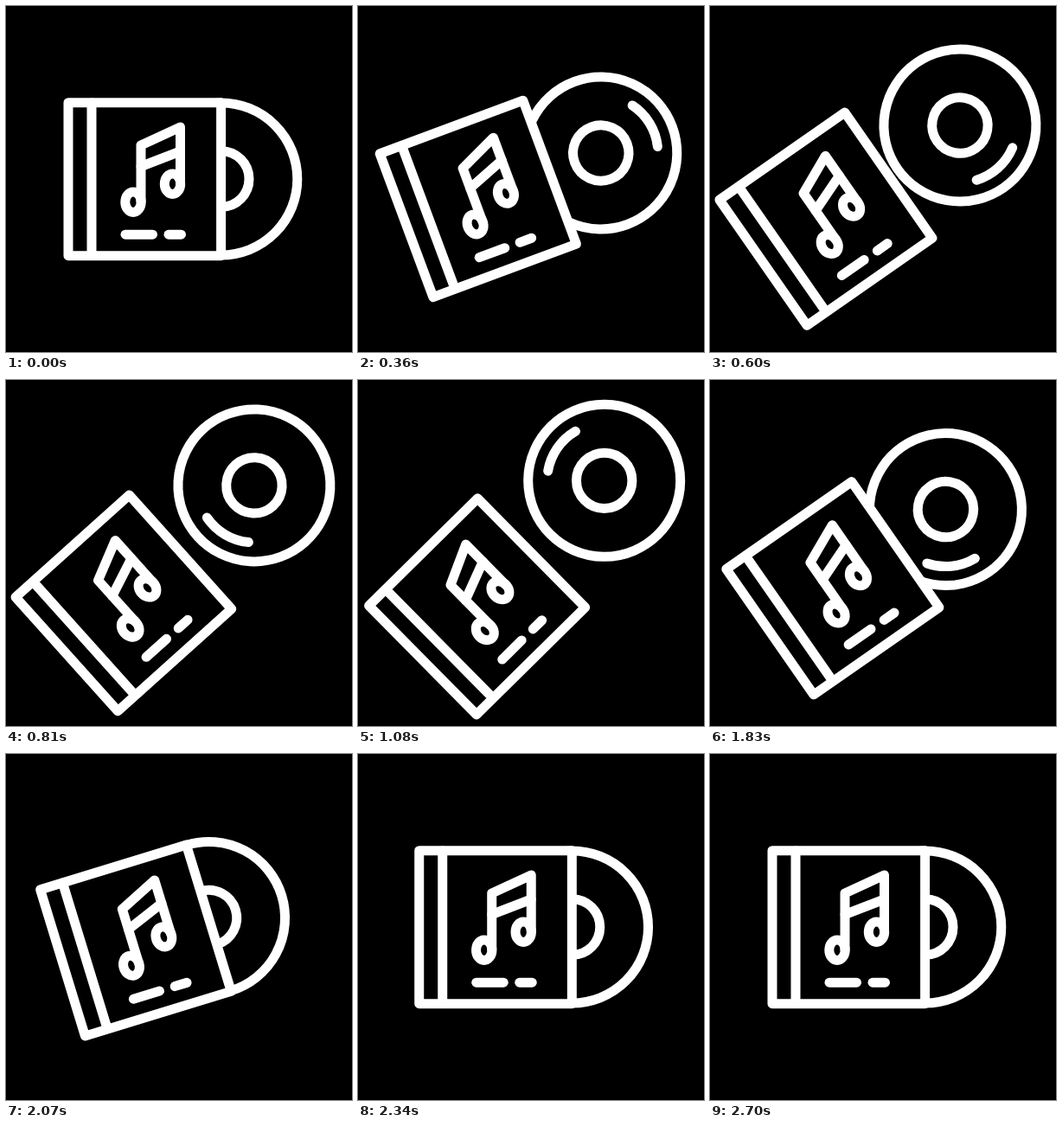
These frames come from a looping animation (400 by 400 pixels, 2730 ms). An HTML page with a canvas:

```html
<!DOCTYPE html>
<html lang="en">
<head>
<meta charset="utf-8">
<title>Music disc</title>
<style>
html, body { margin: 0; width: 100%; height: 100%; overflow: hidden; background: #000; }
canvas { display: block; width: 400px; height: 400px; }
</style>
</head>
<body>
<canvas id="stage" width="400" height="400"></canvas>
<script>
const ctx = document.getElementById('stage').getContext('2d');
const LOOP = 2730, HALF = 1350, RAD = Math.PI / 180;

// Eased progress from 0 to 1: a shapes the start, b the end.
function ease(t, start, length, a, b) {
  const u = Math.min(1, Math.max(0, (t - start) / length));
  return 1 - (1 - u ** a) ** b;
}

const goOut = (t, b) => ease(t, 0, HALF, 1.6, b);
const goBack = (t, length, a, b) => 1 - ease(t, HALF, length, a, b);

function pose(t) {
  const slide = goOut(t, 5.9);
  return {
    tilt: 44.8 * goOut(t, 4.72) * goBack(t, 900, 2.65, 1.2),
    caseX: -39.7 - 48.2 * slide * goBack(t, HALF, 2.6, 6.15),
    gap: 88.5 + 118.5 * slide * goBack(t, 720, 2.24, 1),
    spin: -146 + 745 * ease(t, 0, 2700, 1.1, 1.73)
  };
}

function path(...points) {
  ctx.beginPath();
  points.forEach(([x, y]) => ctx.lineTo(x, y));
  ctx.stroke();
}

function ellipse(x, y, rx, ry = rx, from = 0, to = 360) {
  ctx.beginPath();
  ctx.ellipse(x, y, rx, ry, 0, from * RAD, to * RAD);
  ctx.stroke();
}

function drawDisc(spin) {
  ellipse(0, 0, 88);
  ellipse(0, 0, 32.2);
  ellipse(0, 0, 66, 66, spin - 25, spin + 25);
}

function drawCase() {
  ctx.beginPath();
  ctx.rect(-88.3, -88.3, 176.6, 177);
  ctx.fill();
  ctx.stroke();
  path([-61.3, -88], [-61.3, 88]);
}

function drawNote() {
  path([-4.3, 26], [-4.3, -39], [41.2, -60], [41.2, 5]);
  path([-4.3, -14.5], [41.2, -32]);
  ellipse(-13.3, 26.7, 9.2, 11.7);
  ellipse(32.2, 5.7, 9.2, 11.7);
  path([-22.3, 64.2], [9.2, 64.2]);
  path([27.7, 64.2], [42.2, 64.2]);
}

function frame(now) {
  const { tilt, caseX, gap, spin } = pose(Math.floor(now % LOOP / 30) * 30);
  ctx.setTransform(1, 0, 0, 1, 0, 0);
  ctx.fillStyle = '#000';
  ctx.fillRect(0, 0, 400, 400);
  ctx.strokeStyle = '#fff';
  ctx.lineWidth = 11;
  ctx.lineCap = ctx.lineJoin = 'round';
  ctx.translate(200, 200);
  ctx.rotate(-tilt * RAD);
  ctx.translate(caseX + gap, 0);
  drawDisc(spin);
  ctx.translate(-gap, 0);
  drawCase();
  drawNote();
}

let start;
function tick(now) {
  start ??= now;
  frame(now - start);
  requestAnimationFrame(tick);
}
frame(0);
requestAnimationFrame(tick);
</script>
</body>
</html>
```
